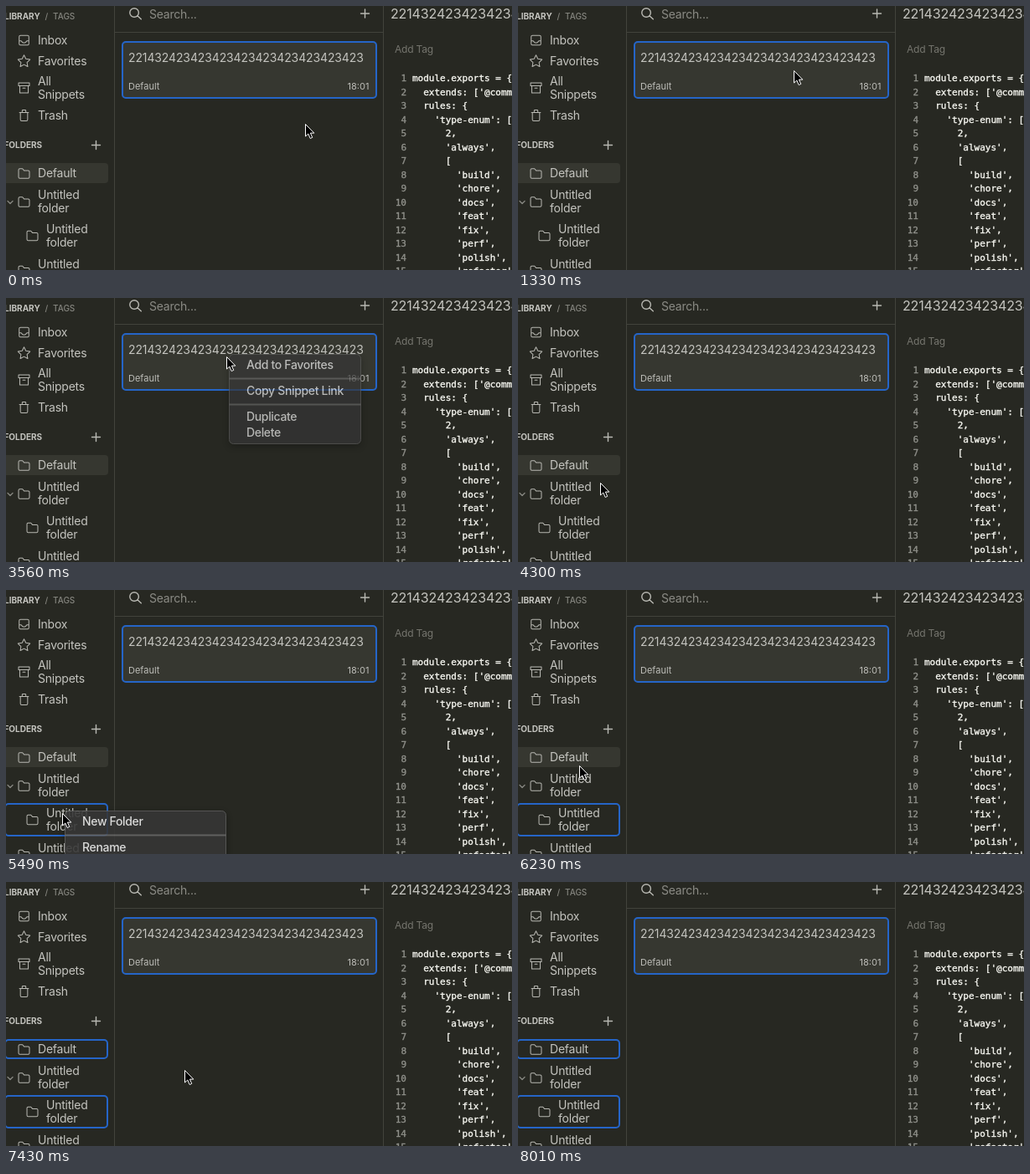
Write an HTML page that moves like this. It is 604 px wide and 316 px high and loops after 8610 ms.

```html
<!DOCTYPE html>
<html lang="en">
<head>
<meta charset="utf-8">
<title>Snippet and folder context menus</title>
<style>
  html, body { margin: 0; width: 100%; height: 100%; overflow: hidden; background: #272822; }
  svg { display: block; }
  text { font: 14px Inter, "Open Sans", sans-serif; letter-spacing: -.016em; fill: #c4c4bf; white-space: pre; }
  .small { font-size: 11px; letter-spacing: 0; fill: #bdbdb8; }
  .head { font-size: 10px; font-weight: 700; letter-spacing: 0; }
  .dim { font-weight: 500; fill: #85857f; }
  .hint { fill: #8b8b85; }
  .tag { font-size: 12px; fill: #75756e; }
  .digits { letter-spacing: -.009em; }
  .title { font-size: 16px; }
  .code { font: 11px "DejaVu Sans Mono", monospace; letter-spacing: 0; fill: #f8f8f2; stroke: #f8f8f2; stroke-width: .35; }
  .num { fill: #90918b; stroke: #90918b; text-anchor: end; }
  .icon { fill: none; stroke: #b9b9b3; stroke-width: 1.4; stroke-linecap: round; stroke-linejoin: round; }
  .faint { stroke: #85857f; }
  .rule { fill: none; stroke: #42433c; }
  .row { fill: #363730; }
  .ring { fill: none; stroke: #2565c8; stroke-width: 2; }
  .menu { filter: drop-shadow(0 3px 4px rgba(0, 0, 0, .35)); }
  .menu rect { fill: #363636; stroke: #5c5c5c; }
  .menu path { stroke: #686868; stroke-width: 2; }
  .menu text { fill: #f4f4f4; font-weight: 500; letter-spacing: -.024em; }
  #cursor { fill: #000; stroke: #fff; stroke-linejoin: round; }
</style>
</head>
<body>
<svg id="stage" width="604" height="316" viewBox="0 0 604 316"></svg>
<script>
const LOOP = 8610, STEP = 148.45, CODE_TOP = 90, LINE = 16.5;

const icons = {
  inbox: 'M6 4h12a2 2 0 0 1 2 2v12a2 2 0 0 1-2 2H6a2 2 0 0 1-2-2V6a2 2 0 0 1 2-2M4 13h3l3 3h4l3-3h3',
  star: 'M12 17.75l-6.17 3.25 1.18-6.87-5-4.87 6.9-1L12 2l3.09 6.26 6.9 1-5 4.87 1.18 6.87z',
  archive: 'M3 3.5h18v5H3zM5 8.5V20.5h14V8.5M10 12.5h4',
  trash: 'M4.5 7h15M6 7v12a2 2 0 0 0 2 2h8a2 2 0 0 0 2-2V7M9 7V4a1 1 0 0 1 1-1h4a1 1 0 0 1 1 1v3',
  folder: 'M5 4h4.5l2.5 3h7a2 2 0 0 1 2 2v9a2 2 0 0 1-2 2H5a2 2 0 0 1-2-2V6a2 2 0 0 1 2-2'
};

const text = (x, y, s, cls = '') => `<text x="${x}" y="${y}" class="${cls}">${s}</text>`;
const rect = (x, y, w, h, cls, id = '') =>
  `<rect id="${id}" x="${x}" y="${y}" width="${w}" height="${h}" rx="4" class="${cls}"/>`;
const path = (d, cls = 'icon') => `<path d="${d}" class="${cls}"/>`;
const icon = (name, cx, cy) =>
  `<g transform="translate(${cx} ${cy}) scale(.72) translate(-12 -12)">${path(icons[name])}</g>`;
const plus = (x, y) => path(`M${x - 5} ${y}h10M${x} ${y - 5}v10`);

const digits = '2214324' + '234'.repeat(8) + '23';
const types = ['build', 'chore', 'docs', 'feat', 'fix', 'perf', 'polish', 'refactor'];
const code = [
  'module.exports = {',
  "  extends: ['@commitlint/config-conventional'],",
  '  rules: {',
  "    'type-enum': [",
  '      2,',
  "      'always',",
  '      [',
  ...types.map(t => `        '${t}',`)
];

const sidebar =
  text(-2, 16, 'LIBRARY', 'head') + text(46.5, 16, '/', 'head dim') + text(56, 16, 'TAGS', 'head dim') +
  icon('inbox', 21.5, 41) + text(38, 46, 'Inbox') +
  icon('star', 21.5, 66) + text(38, 71, 'Favorites') +
  icon('archive', 21.5, 98) + text(38, 95, 'All') + text(38, 111, 'Snippets') +
  icon('trash', 21.5, 131) + text(38, 136, 'Trash') +
  text(-2.5, 170, 'FOLDERS', 'head') + plus(107.5, 166.5) +
  rect(-5, 188, 127, 24, 'row', 'chosen') +
  rect(-1, 189, 122, 22, 'ring', 'topRing') + rect(-1, 256, 122, 38, 'ring', 'subRing') +
  icon('folder', 21.5, 200.5) + text(38, 205, 'Default') +
  path('M2 233.5l3 3 3-3', 'icon faint') +
  icon('folder', 21.5, 234.5) + text(38, 231, 'Untitled') + text(38, 247, 'folder') +
  icon('folder', 31.5, 275) + text(48, 272, 'Untitled') + text(48, 288, 'folder') +
  icon('folder', 21.5, 317) + text(38, 314, 'Untitled');

const list =
  path('M129.5 0V316M450.5 0V316M130 31.5H450', 'rule') +
  path('M147.8 8a5.3 5.3 0 1 0 10.6 0a5.3 5.3 0 1 0-10.6 0M157 11.8l4.3 4') +
  text(171, 15, 'Search...', 'hint') + plus(428.5, 9) +
  rect(139, 43, 303, 67, 'row') + rect(139, 43, 303, 67, 'ring') +
  text(146, 67, digits, 'digits') + text(146, 100, 'Default', 'small') + text(407.5, 100, '18:01', 'small');

const editor =
  text(459, 15, digits, 'digits title') + text(464, 56, 'Add Tag', 'tag') +
  code.map((s, i) => {
    const y = CODE_TOP + i * LINE;
    return text(478, y, i + 1, 'code num') + text(485, y, s, 'code');
  }).join('');

// '-' is a separator
const snippetItems = ['Add to Favorites', '-', 'Copy Snippet Link', '-', 'Duplicate', 'Delete'];
const folderItems = ['New Folder', '-', 'Rename', 'Delete', '-', 'Collapse All', 'Expand All'];

// Opacity keys: [step, value]
const menus = [
  { x: 332, y: 67, w: 158, items: snippetItems, fade: [[11, 0], [12, .7], [14, .88], [15, .95], [17, 0]] },
  { x: 266, y: 67, w: 158, items: snippetItems, fade: [[23, 0], [24, .7], [25, .9], [27, 0]] },
  { x: 70, y: 264, w: 193, items: folderItems, fade: [[32, 0], [33, .7], [35, .95], [36, .97], [37, .88], [39, 0]] },
  { x: 77, y: 196, w: 193, items: folderItems, fade: [[43, 0], [44, .7], [46, .95], [47, .98], [49, 0]] }
];

// Pointer keys: [step, x, y]
const route = [
  [1, 357, 141], [5, 329, 84], [6, 329, 84], [7, 329, 83], [8, 329, 83], [10, 329, 70],
  [19, 329, 70], [22, 263, 70], [26, 263, 70], [29, 98, 221], [31, 67, 267],
  [38, 67, 267], [40, 69, 242], [43, 74, 199], [48, 74, 199], [54, 612, 300]
];

function menu({ x, y, w, items }) {
  let h = 4, body = '';
  for (const s of items) {
    if (s === '-') {
      body += `<path d="M0 ${h + 6.5}H${w}"/>`;
      h += 12;
    } else {
      body += text(21, h + 14, s);
      h += 19;
    }
  }
  return `<g class="menu" transform="translate(${x} ${y})">
    <rect x=".5" y=".5" width="${w - 1}" height="${h + 3}" rx="5"/>${body}</g>`;
}

const $ = id => document.getElementById(id);
$('stage').innerHTML = sidebar + list + editor + menus.map(menu).join('') +
  '<path id="cursor" d="M.5.5V15l3.3-3 2.4 5.5 2.5-1.1-2.3-5.3H10.8z"/>';
const menuNodes = document.querySelectorAll('.menu');

// Eased values of a key list at a step, held beyond both ends
function at(keys, step) {
  const i = keys.findIndex(k => k[0] > step);
  if (i < 0) return keys[keys.length - 1].slice(1);
  if (i === 0) return keys[0].slice(1);
  const a = keys[i - 1], b = keys[i];
  const u = (step - a[0]) / (b[0] - a[0]), e = u * u * (3 - 2 * u);
  return a.slice(1).map((v, j) => v + (b[j + 1] - v) * e);
}

const show = (node, on) => { node.style.display = on ? '' : 'none'; };

function draw(now) {
  const step = Math.floor((now % LOOP + 7) / STEP);
  const [x, y] = at(route, step % 58).map(Math.round);
  $('cursor').setAttribute('transform', `translate(${x} ${y})`);
  menus.forEach((m, i) => {
    const [alpha] = at(m.fade, step);
    menuNodes[i].style.opacity = alpha;
    show(menuNodes[i], alpha > 0);
  });
  show($('subRing'), step >= 33 && step < 58);
  show($('topRing'), step >= 44 && step < 58);
  show($('chosen'), step < 44 || step >= 58);
}

const start = performance.now();
function tick() {
  draw(performance.now() - start);
  requestAnimationFrame(tick);
}
tick();
</script>
</body>
</html>
```
